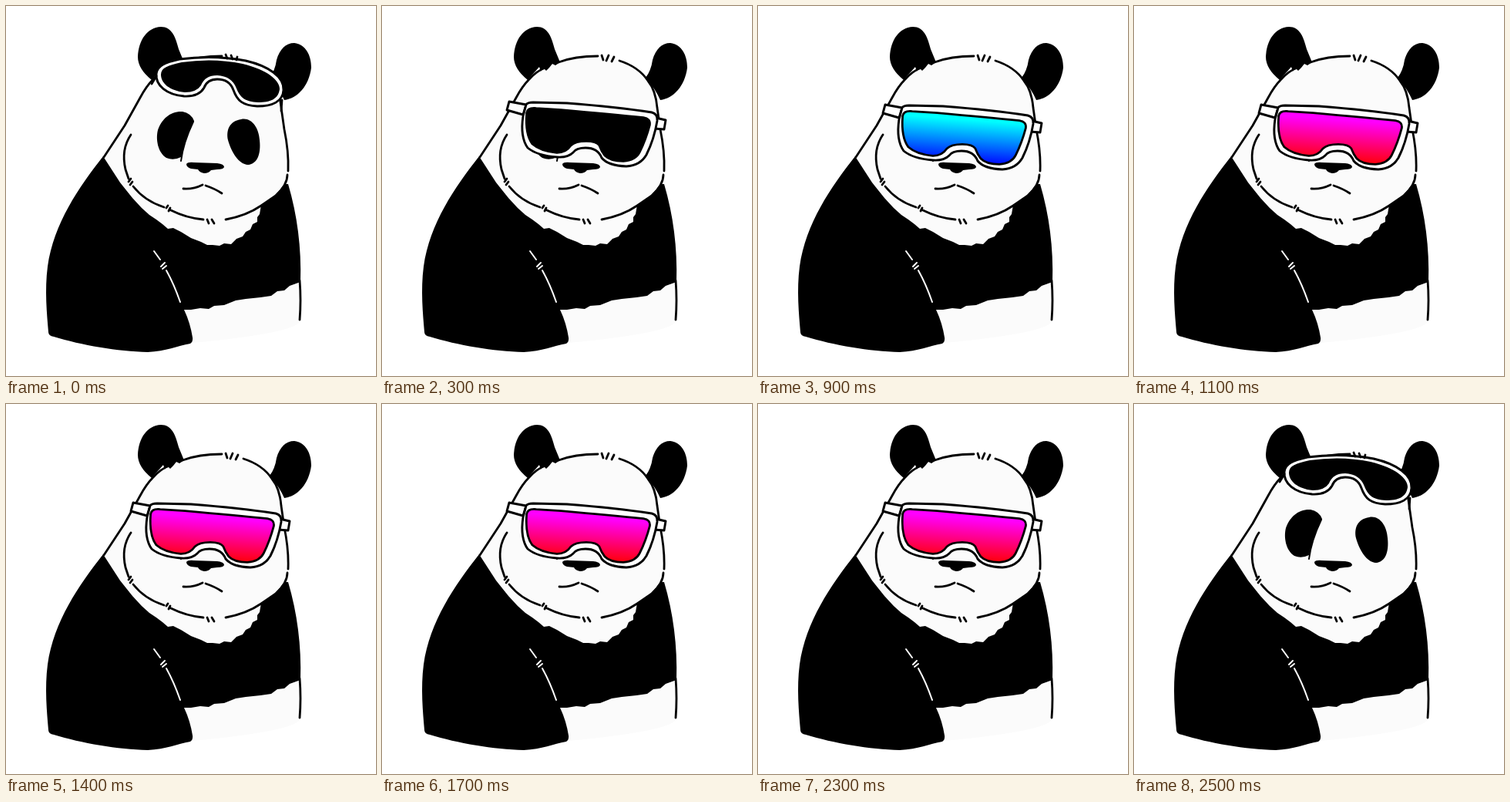
Recreate the animation shown at these times as an HTML page. Size 480 by 480 pixels, loop 2.8 s.

```html
<!DOCTYPE html>
<html lang="en">
<head>
<meta charset="utf-8">
<title>Panda with ski goggles</title>
<style>
  html, body { margin: 0; width: 100%; height: 100%; overflow: hidden; background: #fff; }
  svg { display: block; width: 100vw; height: 100vh; }
  .line { fill: none; stroke: #000; stroke-width: 2.8; stroke-linecap: round; stroke-linejoin: round; }
  .rim { fill: #fff; stroke: #000; stroke-width: 2.9; stroke-linejoin: round; }
  .fur { fill: #fbfbfb; }
</style>
</head>
<body>
<svg viewBox="0 0 480 480">
  <defs id="defs"></defs>

  <!-- head, chest and belly -->
  <path class="fur" d="M127 197 L165 136 L189 97 Q204 78 229 73 Q256 65 290 66 Q328 72 345 95 Q356 112 358 140 Q367 180 366 220 L362 236 L331 259 L326 292 L280 314 L200 290 L140 226Z"/>
  <path class="fur" d="M222 380 L381 350 L383 395 L381 410 Q370 425 242 437Z"/>

  <!-- body -->
  <path d="M126 195 C94 236 62 282 54 338 C50 368 53 400 55 423 Q55 428 62 429 C98 440 145 448 184 449 C208 448 222 441 239 438 Q243 435 242 430 Q239 411 231 394
    L240 394 L252 392 L263 393 L270 389 L283 388 L298 382 L311 380 L330 378 L344 376 L352 370 L361 369 L368 363 L382 358
    Q384 292 366 231 L361 231 Q349 249 331 258 L329 270 L326 274 L326 280 L320 283 L317 290 L311 293 L307 299 L299 302 L292 309 L283 308 L277 311 L268 310 L261 310 L253 306 L240 301 L227 293 L217 288 L210 289 L203 283 L195 277 L186 271 L176 262 L164 249 L148 229 Z"/>
  <path class="line" d="M381 356 Q383 382 381 407"/>
  <path class="line" style="stroke:#fff;stroke-width:2" d="M192 318 L200 329 M201 338 L206 333 M203 341 L208 337 M208 343 Q218 361 226 384"/>

  <!-- ears -->
  <path d="M189 96 C178 87 171 77 171 66 C172 44 183 28 201 27 C215 27 220 40 224 56 L231 73 L225 77 L221 75 L217 80 L213 84 L209 80 L206 85 L204 79 Q196 88 189 96Z"/>
  <path d="M342 93 Q349 84 351 70 C355 56 363 48 374 48 C389 50 396 64 396 80 C393 104 378 120 361 122 Q355 108 342 93Z"/>

  <!-- head outline, jaw and mouth -->
  <path class="line" d="M127 196 L154 155 L174 119 Q182 104 191 95 Q201 84 212 80 M229 73 Q250 65 280 65 M308 71 Q333 79 345 97 Q355 109 357 132 L361 160 Q367 189 366 214 M365 219 Q365 232 350 246 L331 259 Q312 272 285 277
    M162 167 Q149 186 155 212 L159 224 M159 228 L162 224 M161 232 L164 228 M165 234 Q180 253 205 261 M208 262 L210 259 M211 266 L213 262 M214 265 Q234 275 256 277 M261 277 L263 282 M267 277 L270 282
    M230 237 Q243 238 255 232 M259 233 Q271 237 280 243"/>
  <path d="M234 205 Q236 202 244 203 L274 204 Q283 205 283 209 Q282 212 274 212 L266 213 Q263 217 257 217 Q251 216 249 212 L240 211 Q234 209 234 205Z"/>

  <!-- eyes -->
  <path d="M229 137 Q240 139 244 149 Q232 174 227 196 Q217 201 208 197 C197 190 194 173 197 161 C202 146 214 136 229 137Z"/>
  <path class="line" style="stroke-width:2" d="M243 150 Q230 177 227 201"/>
  <path d="M305 147 C318 144 328 157 329 174 C331 192 326 205 314 206 C302 205 293 191 288 174 C285 160 291 149 305 147Z"/>

  <!-- goggles on the forehead -->
  <g id="up">
    <path class="rim" d="M195 88 C196 77 207 73 225 69 Q270 63 311 71 C341 78 361 92 360 109 C359 124 345 130 326 130 C307 129 300 123 295 109 Q290 95 274 95 Q261 95 257 106 Q250 118 231 117 C208 115 194 103 195 88Z"/>
    <path d="M201 89 C201 80 210 77 228 73 Q270 67 307 75 C339 83 355 96 355 108 C353 121 343 125 327 125 C310 124 304 119 299 107 Q293 91 274 90 Q258 90 253 103 Q247 112 232 112 C212 110 201 100 201 89Z"/>
    <path class="line" d="M285 63 L287 68 M292 64 L294 69 M300 66 L299 70 M358 122 L357 136 M195 91 L189 101"/>
  </g>
  <path id="ticks" class="line" d="M285 64 L287 70 M294 64 L291 71 M301 66 L298 72"/>

  <!-- goggles over the eyes -->
  <g id="down">
    <path class="rim" d="M165 128 L187 132 L183 145 L162 139Z M355 149 L368 152 L366 164 L353 163Z"/>
    <path class="rim" d="M187 132 Q189 129 196 129 L240 130 Q305 135 350 142 Q358 144 357 153 Q353 177 343 197 Q335 211 317 212 Q293 211 285 201 Q280 188 264 188 Q252 188 248 194 Q241 201 227 200 Q201 198 189 188 Q179 174 183 147Z"/>
    <path id="lens" stroke="#000" stroke-width="5.6" stroke-linejoin="round" paint-order="stroke" d="M189 143 Q190 137 200 138 L232 140 Q300 146 339 150 Q347 151 346 158 Q341 177 333 193 Q328 203 313 204 Q297 204 290 197 Q286 192 283 184 Q279 178 265 178 Q250 178 244 184 Q238 193 227 193 Q206 191 196 182 Q187 170 189 143Z"/>
  </g>
</svg>
<script>
  const LOOP = 2800, STEP = 100;
  const DROP = 200, WORN = 300, FLASH = 400, LIFT = 2500;
  const tints = [
    ['#ffff00', '#00ff00'],
    ['#ff00ff', '#ff0000'],
    ['#00ffff', '#0000ff']
  ];
  const get = id => document.getElementById(id);
  const show = (id, on) => get(id).setAttribute('display', on ? 'inline' : 'none');

  get('defs').innerHTML = tints.map(([top, bottom], i) =>
    `<linearGradient id="tint${i}" gradientUnits="userSpaceOnUse" x1="267" y1="147" x2="263" y2="204">
      <stop stop-color="${top}"/><stop offset="1" stop-color="${bottom}"/></linearGradient>`).join('');

  function draw(ms) {
    const t = ms % LOOP;
    const worn = t >= DROP && t < LIFT;
    const lit = t >= FLASH && t < LIFT;
    const tint = Math.floor((t - FLASH) / STEP) % tints.length;
    const lift = lit ? 0 : t < WORN ? -36 : -4;
    show('up', !worn);
    show('ticks', worn);
    show('down', worn);
    get('down').setAttribute('transform', `translate(0 ${lift})`);
    get('lens').setAttribute('fill', lit ? `url(#tint${tint})` : '#000');
  }

  const start = performance.now();
  function tick() {
    draw(performance.now() - start);
    requestAnimationFrame(tick);
  }
  draw(0);
  requestAnimationFrame(tick);
</script>
</body>
</html>
```
